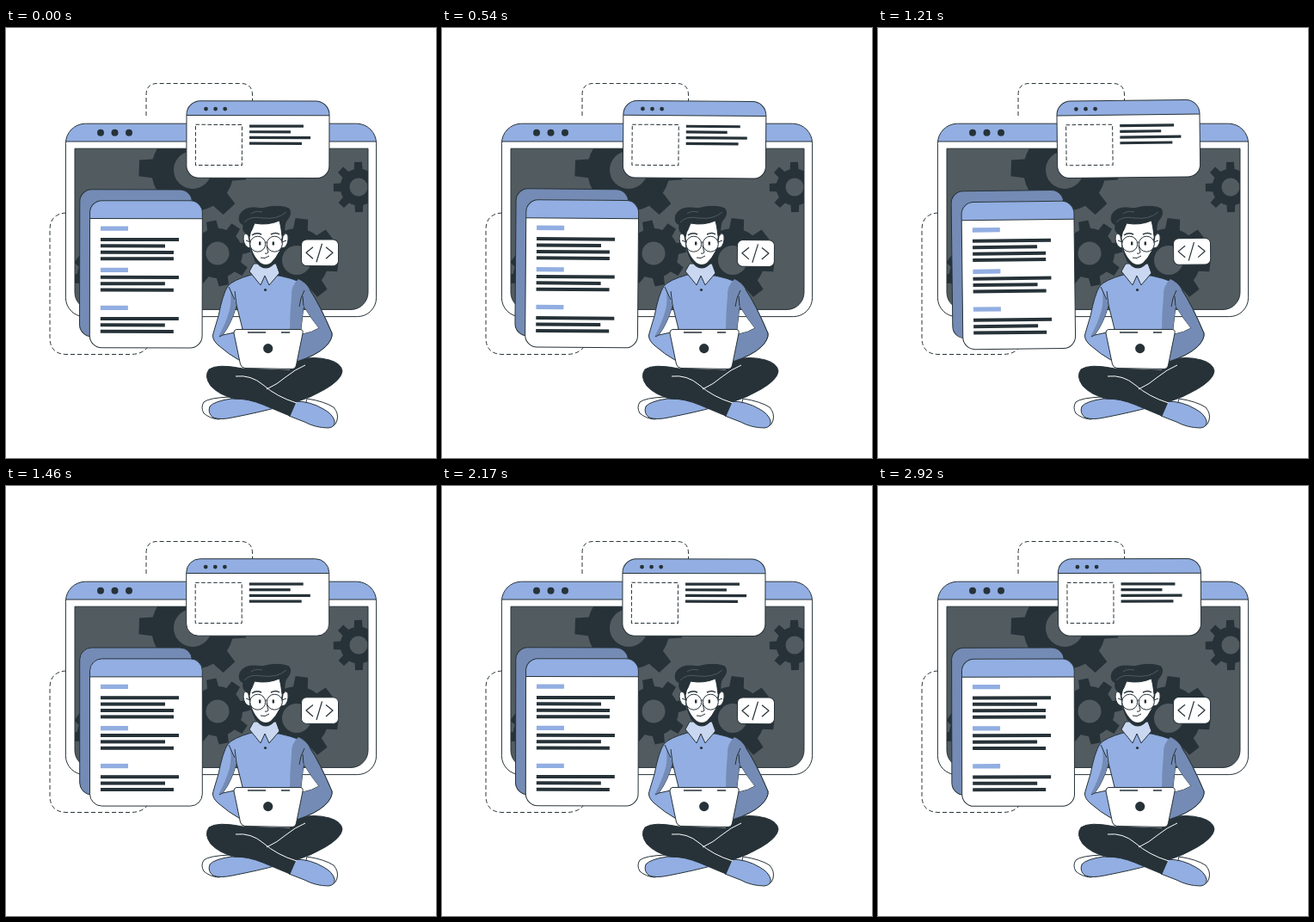
Animation, 500 px wide and 500 px high, one loop 2.96 s. Source, as an HTML page with a canvas:

```html
<!DOCTYPE html>
<html lang="en">
<head>
<meta charset="utf-8">
<title>Developer at work</title>
<style>
html, body { margin: 0; width: 100%; height: 100%; overflow: hidden; background: #fff; }
canvas { display: block; width: 500px; height: 500px; }
</style>
</head>
<body>
<canvas id="stage"></canvas>
<script>
const DARK = '#263238', BLUE = '#92aee2', SHADE = '#748bb5', PALE = '#c9d7f1';
const SCREEN = '#525b60', WHITE = '#fff';
const LOOP = 2960, SWAY = 1500, FPS = 24;

const canvas = document.getElementById('stage');
const ctx = canvas.getContext('2d');
const ratio = window.devicePixelRatio || 1;
canvas.width = canvas.height = 500 * ratio;

function shape(d, fill, stroke, width = 1) {
  const path = typeof d === 'string' ? new Path2D(d) : d;
  if (fill) { ctx.fillStyle = fill; ctx.fill(path); }
  if (stroke) { ctx.strokeStyle = stroke; ctx.lineWidth = width; ctx.stroke(path); }
}

function line(d, color = DARK, width = 1) { shape(d, null, color, width); }

function dot(x, y, r, fill = DARK, stroke) {
  const p = new Path2D();
  p.arc(x, y, r, 0, Math.PI * 2);
  shape(p, fill, stroke);
}

function box(x, y, w, h, radii) {
  const p = new Path2D();
  p.roundRect(x, y, w, h, radii);
  return p;
}

function dashed(d, dash) {
  ctx.setLineDash(dash);
  line(d);
  ctx.setLineDash([]);
}

// Browser window: x, y, width, height, header height, top and bottom radius
function panel(x, y, w, h, head, top, bottom) {
  const p = box(x, y, w, h, [top, top, bottom, bottom]);
  shape(p, WHITE);
  ctx.save();
  ctx.clip(p);
  ctx.fillStyle = BLUE;
  ctx.fillRect(x, y, w, head);
  line(`M${x} ${y + head}h${w}`);
  ctx.restore();
  line(p);
}

function bars(x, y, gap, height, ends) {
  ctx.fillStyle = DARK;
  ends.forEach((end, i) => ctx.fillRect(x, y + i * gap - height / 2, end - x, height));
}

function gear(x, y, outer, root, hole, degrees) {
  const p = new Path2D();
  for (let i = 0; i < 8; i++) {
    const a = degrees * Math.PI / 180 + i * Math.PI / 4;
    p.arc(x, y, root, a - Math.PI / 4 + 0.23, a - 0.23);
    p.lineTo(x + outer * Math.cos(a - 0.15), y + outer * Math.sin(a - 0.15));
    p.lineTo(x + outer * Math.cos(a + 0.15), y + outer * Math.sin(a + 0.15));
  }
  p.closePath();
  shape(p, DARK);
  dot(x, y, hole, SCREEN);
}

function backdrop() {
  dashed('M163 102V78Q163 64.5 176 64.5H273Q286.5 64.5 286.5 78V86', [5, 3]);
  dashed('M70 215Q51 216 51 235V360Q51 379.5 71 379.5H145Q158 379.5 165 371', [5, 3]);
  panel(69.4, 111.2, 361.2, 224.4, 20.8, 23, 22);
  for (const x of [110, 126.5, 143]) dot(x, 121.7, 4);

  const view = box(80, 140.2, 341, 187.2, [0, 0, 20, 20]);
  shape(view, SCREEN);
  ctx.save();
  ctx.clip(view);
  gear(217, 165, 63, 48, 22, 2);
  gear(246, 262, 38.5, 29, 13.5, -101);
  gear(338, 270, 49, 37, 17, -83);
  gear(410, 185, 29.5, 21.5, 10.5, -91);
  gear(108, 287, 32, 25, 10, -10);
  ctx.restore();
  line(view);
}

function floaters(angle) {
  ctx.save();
  ctx.translate(250, 250);
  ctx.rotate(angle * Math.PI / 180);
  ctx.translate(-250, -250);

  shape(box(85.7, 188, 130.6, 171, 14), SHADE, DARK);
  panel(97.5, 200.9, 130.8, 171.2, 21, 14, 14);
  ctx.fillStyle = BLUE;
  for (const y of [230.7, 279, 322.9]) ctx.fillRect(110, y, 32, 5.3);
  bars(110, 246.2, 7.4, 4, [201, 185, 195, 195]);
  bars(110, 290, 7.4, 4, [201, 185, 195]);
  bars(110, 338.2, 7.4, 4, [201, 185, 195]);

  panel(209.7, 84.7, 166, 89.5, 16.8, 16, 14);
  for (const x of [232.2, 243.3, 254.4]) dot(x, 94.1, 2.4);
  dashed(box(220.2, 112.4, 54, 47.1, 0), [4.5, 2.5]);
  bars(282.8, 114, 6.7, 3.2, [345.7, 330.7, 353.8, 343.7]);

  shape(box(343.5, 245.8, 43, 30.6, 6), WHITE, DARK);
  line('M357 254.5L349 261L357 268M367.5 250.5L361 272M372 254.5L380 261L372 268', DARK, 1.2);
  ctx.restore();
}

function legs() {
  shape('M260 429Q236 430 230 435Q226 441 230 448Q237 454 247 455L280 448Z', WHITE, DARK);
  shape('M262 431Q242 434 237 440Q234 448 241 453Q249 456 263 453Q294 447 316 441L300 432Z', BLUE, DARK);
  shape('M350 431Q370 434 381 441Q387 448 385 456Q384 461 380 463L345 450Z', WHITE, DARK);
  shape('M336 434Q354 434 369 443Q380 449 382 457Q383 464 375 465Q360 465 347 458L329 451Z', BLUE, DARK);
  shape('M275 396Q246 390 236 397Q230 405 238 416Q248 427 266 431Q282 431 299 438L330 451L337 435' +
    'Q354 430 371 420Q390 409 391 399Q390 390 376 386Q358 381 338 386L330 398Z', DARK, DARK);
  line('M267 405Q285 403 299 415Q315 429 338 436M348 392Q336 397 325 406Q316 414 303 420', WHITE);
}

function torso() {
  // The last two loops are the gaps between the arms and the body
  shape('M285 287Q264 293 258 300Q252 309 247 335Q243 348 240.5 357Q240 363 247 369Q258 379 274 388' +
    'H338Q360 381 371 371Q380 362 379 355Q365 322 353 304Q347 294 318 288Z' +
    'M268 322L275 350L266 354L252 357Q263 342 268 322Z' +
    'M346 323Q355 338 364 349Q356 354 345 356L343 350Z', BLUE, DARK);
  shape('M260 302Q263 311 268 322Q263 342 252 357L247 359Q255 345 260 328Q263 315 260 302Z', SHADE);
  shape('M340 292Q331 300 332 312Q330 332 330 351H343L346 323Q355 338 364 349Q356 354 345 356' +
    'L338 388Q360 381 371 371Q380 362 379 355Q365 322 353 304Q349 296 340 292Z', SHADE);
  line('M259 301L266 316M266 306L268 322M248 359L252 357M347 305Q342 314 341 324M345 312L346 323' +
    'M338 388Q360 381 371 371Q380 362 379 355Q365 322 353 304');
  shape('M288 274L283 283L296 299L301 288L306 299L318 285L314 274Z', PALE, DARK);
  dot(301.5, 304.5, 1.6);
}

function head() {
  shape('M283 240Q276 236 276 245Q277 255 284 256Z', WHITE, DARK);
  shape('M321 240Q329 236 328 246Q327 256 320 256Z', WHITE, DARK);
  // Hair and beard form one mass, the face lies on top
  shape('M282 224L281 240L285 260Q288 271 295 277Q302 282 309 277Q317 271 320 259L323 239L321 220Z', DARK);
  shape('M287 226Q304 229 318 222L321 241L318 259Q314 267 308 273Q302 277 296 273Q289 267 286 258L283.5 244Z', WHITE);
  shape('M282 241Q274 237 276 229Q269 226 272 217Q277 208 290 209Q298 211 306 208Q321 206 329 210' +
    'Q333 216 327 223Q323 227 324 240L321 242Q320 231 318 224Q304 230 289 227Q286 236 282 241Z', DARK, DARK);
  line('M277 226Q284 218 298 221Q316 223 326 214M285 216Q290 212 298 214', '#6c767b', 0.6);
  line('M286 241Q291 237 297 240M308 240Q314 237 318 240', DARK, 1.4);
  dot(292.7, 251.2, 9, WHITE, DARK);
  dot(312.3, 251.2, 9, WHITE, DARK);
  line('M301 250Q302.5 248 304 250M284 249L279 247M321 249L326 247');
  line('M295.2 248.5V252.5M310.8 248.5V252.5', DARK, 2.4);
  line('M303 253L305 261Q303 263 301 262M296 267Q301 269 306 265');
}

function laptop() {
  shape('M268 350.5H342Q346 351 345 355L337.5 392Q336.5 396.5 332 396.5L278 395.5Q273.5 395 272.5 391' +
    'L265 355Q264.5 351 268 350.5Z', WHITE, DARK);
  line('M281 354H302M320 354H330', DARK, 1.3);
  dot(304.7, 372.6, 5.6);
}

// Triangle wave: 0, 1, 0, -1 over one period
function sway(ms) {
  const p = (ms % SWAY) / SWAY;
  return p < 0.25 ? p * 4 : p < 0.75 ? 2 - p * 4 : p * 4 - 4;
}

function draw(now) {
  const t = now % LOOP;
  // Motion steps at 24 per second, on a 10 ms clock
  const step = Math.floor((Math.floor(t / 10) * 10 + 4.9) * FPS / 1000);
  ctx.setTransform(ratio, 0, 0, ratio, 0, 0);
  ctx.fillStyle = WHITE;
  ctx.fillRect(0, 0, 500, 500);
  ctx.lineJoin = 'round';
  backdrop();
  floaters(sway((step + 1) * 1000 / FPS));
  legs();
  torso();
  head();
  laptop();
}

let start;
function tick(now) {
  start ??= now;
  draw(Math.max(0, now - start));
  requestAnimationFrame(tick);
}
draw(0);
requestAnimationFrame(tick);
</script>
</body>
</html>
```
